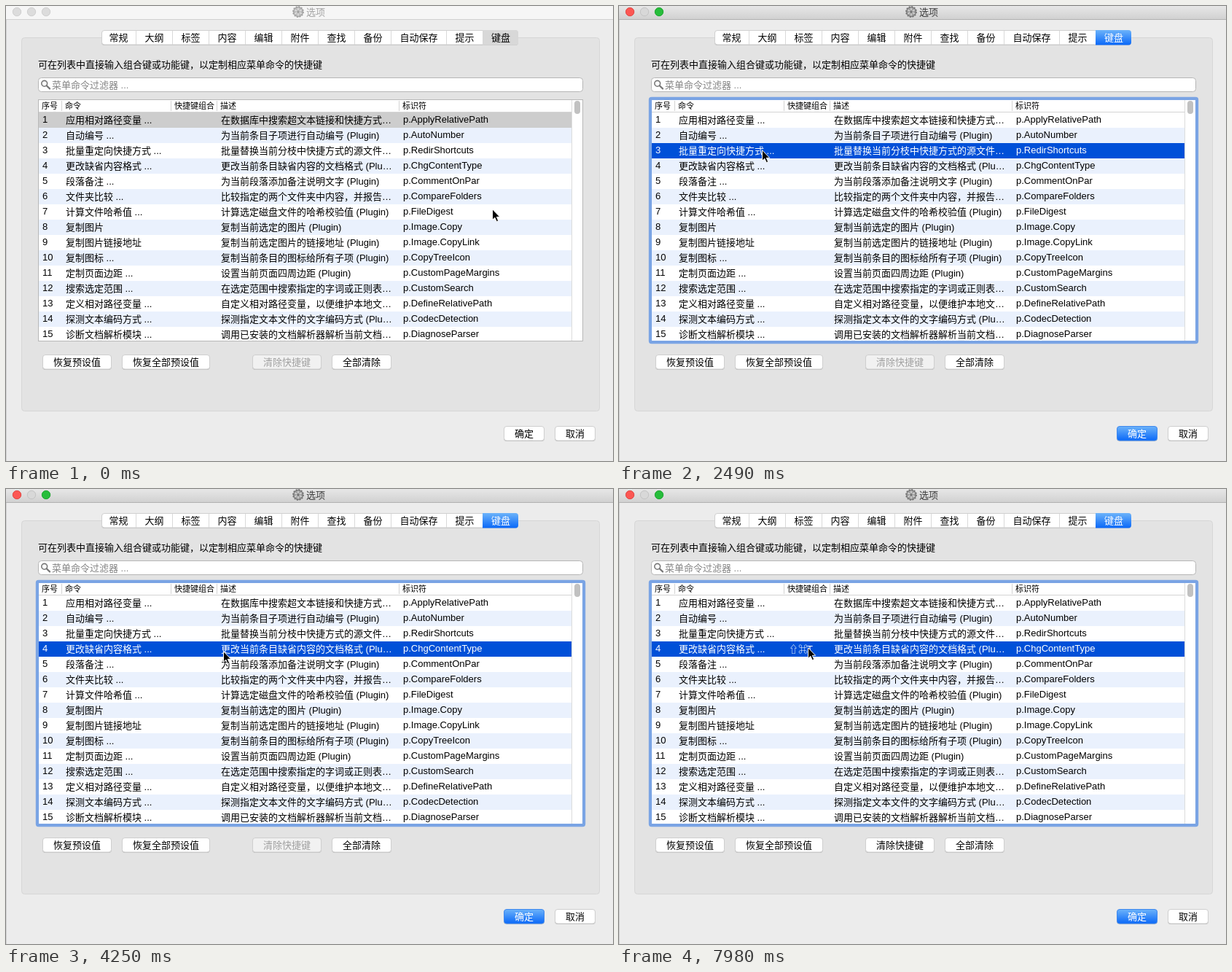
An HTML page that plays this animation: 833x624 px, repeating every 8 s.

```html
<!DOCTYPE html>
<html lang="zh-CN">
<head>
<meta charset="utf-8">
<title>选项</title>
<style>
html, body { margin: 0; width: 100%; height: 100%; overflow: hidden; background: #ececec; }
svg { display: block; width: 100vw; height: 100vh; }
text { font: 13px "Liberation Sans", "Noto Sans CJK SC", "Noto Sans CJK", "DejaVu Sans", sans-serif; white-space: pre; }
.head { font-size: 11px; }
.mid { text-anchor: middle; }
</style>
</head>
<body>
<svg id="stage" viewBox="0 0 833 624">
  <defs>
    <linearGradient id="blue" x2="0" y2="1"><stop stop-color="#6cb3fa"/><stop offset="1" stop-color="#0a68f8"/></linearGradient>
    <linearGradient id="bar" x2="0" y2="1"><stop stop-color="#e7e7e7"/><stop offset="1" stop-color="#d1d1d1"/></linearGradient>
  </defs>
</svg>
<script>
const LOOP = 8000, ACTIVATE = 2490, NEXT_ROW = 3220, SET_KEY = 6940;
const ROW_TOP = 146, ROW_H = 21, TABLE_END = 459;
const stage = document.getElementById('stage');

function add(tag, attrs, text, parent = stage) {
  const el = document.createElementNS('http://www.w3.org/2000/svg', tag);
  set(el, attrs);
  if (text !== undefined) el.textContent = text;
  parent.appendChild(el);
  return el;
}
function set(el, attrs) {
  for (const k in attrs) el.setAttribute(k, attrs[k]);
}
const rect = (x, y, width, height, fill, more) => add('rect', { x, y, width, height, fill, ...more });
const label = (x, y, s, more) => add('text', { x, y, fill: '#000', ...more }, s);
const vline = (x, y, h, fill) => rect(x, y, 1, h, fill);

function button(x, y, w, s) {
  rect(x, y + 1, w, 20, '#c2c2c2', { rx: 4 });
  const box = rect(x + .5, y + .5, w - 1, 19.5, '#fff', { rx: 3.5, stroke: '#cfcfcf' });
  const text = label(x + w / 2, y + 15, s, { class: 'mid' });
  return { box, text };
}

// Window and title bar
rect(0, 0, 833, 624, '#ececec');
vline(0, 19, 605, '#d2d2d2');
const bar = rect(0, 0, 833, 18, '#f6f6f6');
const barLine = rect(0, 18, 833, 1, '#d0d0d0');
const lights = [15, 35, 55].map(cx => add('circle', { cx, cy: 8, r: 5.7 }));
const gear = add('g', { transform: 'translate(401 8)' });
add('circle', { r: 6.9, fill: '#8d8d8d', stroke: '#777', 'stroke-width': 2, 'stroke-dasharray': '2.1 1.51' }, undefined, gear);
add('circle', { r: 6.2, fill: '#a2a2a2', stroke: '#6d6d6d', 'stroke-width': .8 }, undefined, gear);
add('path', { d: 'M0-5.5V5.5M-4.8-2.8L4.8 2.8M-4.8 2.8L4.8-2.8', stroke: '#dedede', 'stroke-width': 1.1 }, undefined, gear);
add('circle', { r: 1.9, fill: '#777' }, undefined, gear);
const title = label(412, 13, '选项');

// Panel and tabs
rect(21.5, 43.5, 793, 512, '#e3e3e3', { rx: 4, stroke: '#d6d6d6' });
rect(131, 34, 572, 20, '#c4c4c4', { rx: 4 });
rect(131.5, 33.5, 571, 19.5, '#fff', { rx: 3.5, stroke: '#d0d0d0' });
const tabs = ['常规', '大纲', '标签', '内容', '编辑', '附件', '查找', '备份', '自动保存', '提示', '键盘'];
const tabFill = add('path', { d: 'M654 33H699Q703 33 703 37V49.5Q703 53.5 699 53.5H654Z' });
let left = 131, tabText;
tabs.forEach((s, i) => {
  const right = i === 0 ? 178 : i === 10 ? 703 : left + (s.length === 4 ? 76 : 50);
  tabText = label((left + right) / 2 + (i ? .5 : 0), 48, s, { class: 'mid' });
  if (i < 9) vline(right, 34, 19, '#d9d9d9');
  left = right;
});

label(44, 85, '可在列表中直接输入组合键或功能键，以定制相应菜单命令的快捷键');

// Filter field
rect(44.5, 98.5, 747, 19, '#fff', { rx: 4, stroke: '#b6b6b6' });
add('circle', { cx: 52.7, cy: 106.3, r: 3.9, fill: 'none', stroke: '#777', 'stroke-width': 1.6 });
add('path', { d: 'M55.7 109.3L60 113.4', stroke: '#777', 'stroke-width': 2.2, 'stroke-linecap': 'round' });
label(63, 113, '菜单命令过滤器 ...', { fill: '#858585' });

// Table
const ring = rect(42.5, 126.5, 751, 335, 'none', { rx: 2, stroke: '#7aa4e4', 'stroke-width': 3.4 });
rect(44, 128, 748, 332, '#fff');
const heads = { 49: '序号', 81: '命令', 231: '快捷键组合', 294: '描述', 544: '标识符' };
for (const x in heads) label(x, 141, heads[x], { class: 'head' });
[76, 226, 289, 539].forEach(x => vline(x, 130, 14, '#d2d2d2'));
rect(45, 145, 731, 1, '#d4d4d4');

const data = `应用相对路径变量 ...|在数据库中搜索超文本链接和快捷方式…|ApplyRelativePath
自动编号 ...|为当前条目子项进行自动编号 (Plugin)|AutoNumber
批量重定向快捷方式 ...|批量替换当前分枝中快捷方式的源文件…|RedirShortcuts
更改缺省内容格式 ...|更改当前条目缺省内容的文档格式 (Plu…|ChgContentType
段落备注 ...|为当前段落添加备注说明文字 (Plugin)|CommentOnPar
文件夹比较 ...|比较指定的两个文件夹中内容，并报告…|CompareFolders
计算文件哈希值 ...|计算选定磁盘文件的哈希校验值 (Plugin)|FileDigest
复制图片|复制当前选定的图片 (Plugin)|Image.Copy
复制图片链接地址|复制当前选定图片的链接地址 (Plugin)|Image.CopyLink
复制图标 ...|复制当前条目的图标给所有子项 (Plugin)|CopyTreeIcon
定制页面边距 ...|设置当前页面四周边距 (Plugin)|CustomPageMargins
搜索选定范围 ...|在选定范围中搜索指定的字词或正则表…|CustomSearch
定义相对路径变量 ...|自定义相对路径变量，以便维护本地文…|DefineRelativePath
探测文本编码方式 ...|探测指定文本文件的文字编码方式 (Plu…|CodecDetection
诊断文档解析模块 ...|调用已安装的文档解析器解析当前文档…|DiagnoseParser`;
const rows = data.split('\n').map((line, i) => {
  const [name, about, id] = line.split('|');
  const y = ROW_TOP + i * ROW_H;
  const back = rect(45, y, 731, Math.min(ROW_H, TABLE_END - y));
  const texts = [
    label(50, y + 14, i + 1),
    label(82, y + 15, name),
    label(295, y + 15, about),
    label(545, y + 14, 'p.' + id)
  ];
  return { back, texts, plain: i % 2 ? '#eaf1fd' : '#fff' };
});
const keys = label('233 246 258', 224, '⇧⌘T', { fill: '#fff' });

vline(776, 129, 330, '#dcdcdc');
rect(780, 130, 8, 18, '#c1c1c1', { rx: 4 });
const frame = rect(44.5, 128.5, 747, 331, 'none', { stroke: '#b8b8b8' });

// Buttons
button(50, 478, 95, '恢复预设值');
button(159, 478, 121, '恢复全部预设值');
const clear = button(338, 478, 95, '清除快捷键');
button(447, 478, 82, '全部清除');
const ok = button(683, 576, 56, '确定');
button(753, 576, 56, '取消');

const pointer = add('path', {
  d: 'M.5.7V15.2L3.8 12.2L6.3 17.7L8.7 16.6L6.3 11.3H10.7Z',
  fill: '#000', stroke: '#fff', 'stroke-width': 1, 'stroke-linejoin': 'round'
});

// Pointer stops: time, x, y
const stops = [
  [0, 667, 278], [300, 560, 302], [450, 380, 346], [590, 262, 371], [730, 234, 375],
  [1180, 234, 346], [1330, 235, 300], [1480, 235, 276],
  [1930, 222, 250], [2080, 203, 212], [2230, 196, 197],
  [2640, 199, 205], [2780, 203, 216], [2930, 206, 224], [3070, 206, 218],
  [3820, 222, 217], [3970, 262, 218], [4120, 298, 222], [4260, 308, 228],
  [4410, 290, 236], [4550, 268, 238], [4700, 252, 236], [4840, 245, 232], [4990, 246, 231],
  [7380, 232, 230], [7530, 208, 227], [7680, 198, 223], [7830, 232, 219], [7980, 259, 217]
];

function render(t) {
  const active = t >= ACTIVATE, hasKey = t >= SET_KEY;
  const picked = !active ? 0 : t < NEXT_ROW ? 2 : 3;

  set(bar, { fill: active ? 'url(#bar)' : '#f6f6f6' });
  set(barLine, { fill: active ? '#b1b1b1' : '#d0d0d0' });
  lights.forEach((el, i) => set(el, {
    fill: active ? ['#fc5753', '#d8d8d8', '#27bd3b'][i] : '#dcdcdc',
    stroke: active ? ['#e04744', '#c4c4c4', '#1fa630'][i] : '#cfcfcf'
  }));
  set(gear, { opacity: active ? 1 : .65 });
  set(title, { fill: active ? '#3c3c3c' : '#a3a3a3' });

  set(tabFill, { fill: active ? 'url(#blue)' : '#d8d8d8' });
  set(tabText, { fill: active ? '#fff' : '#000' });
  set(ok.box, { fill: active ? 'url(#blue)' : '#fff', stroke: active ? '#3f88ee' : '#cfcfcf' });
  set(ok.text, { fill: active ? '#fff' : '#000' });
  set(ring, { opacity: active ? 1 : 0 });
  set(frame, { stroke: active ? '#7aa4e4' : '#b8b8b8' });

  rows.forEach((row, i) => {
    const on = i === picked;
    set(row.back, { fill: !on ? row.plain : active ? '#0050d8' : '#cdcdcd' });
    row.texts.forEach(el => set(el, { fill: on && active ? '#fff' : '#000' }));
  });
  set(keys, { opacity: hasKey ? 1 : 0 });
  set(clear.box, { fill: hasKey ? '#fff' : '#f1f1f1' });
  set(clear.text, { fill: hasKey ? '#000' : '#a0a0a0' });

  const [, x, y] = stops.filter(s => s[0] <= t).pop();
  set(pointer, { transform: `translate(${x} ${y})` });
}

const start = performance.now();
function tick() {
  render((performance.now() - start) % LOOP);
  requestAnimationFrame(tick);
}
tick();
</script>
</body>
</html>
```
